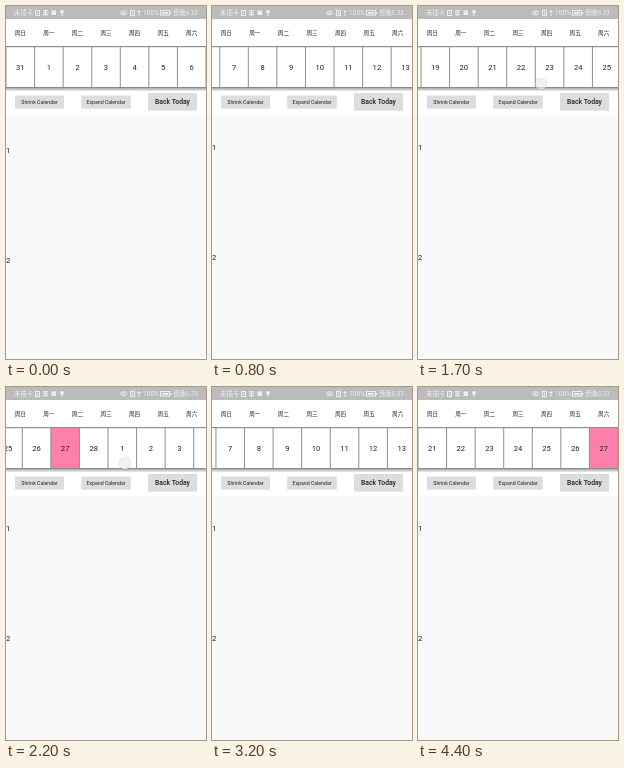
An HTML page with a canvas that plays this animation: 200x353 px, repeating every 4.5 s.

```html
<!DOCTYPE html>
<html lang="zh-CN">
<head>
<meta charset="utf-8">
<title>Week calendar</title>
<style>
  html, body { margin: 0; width: 100%; height: 100%; overflow: hidden; background: #f9f9f9; }
  canvas { display: block; width: 200px; height: 353px; }
</style>
</head>
<body>
<canvas id="stage"></canvas>
<script>
const W = 200, H = 353, LOOP = 4500, STEP = 100, CELL = W / 7;
const LATIN = 'Roboto, "Liberation Sans", sans-serif';
const CJK = '"Noto Sans CJK SC", "Noto Sans CJK", "Noto Sans CJK JP", sans-serif';
const canvas = document.getElementById('stage');
const ctx = canvas.getContext('2d');
const dpr = window.devicePixelRatio || 1;
canvas.width = W * dpr;
canvas.height = H * dpr;

// Each swipe moves one week; x, y is where the finger lifts.
const swipes = [
  { at: 403, dur: 600, dir: 1, x: 118, y: 77 },
  { at: 1020, dur: 500, dir: 1, x: 120, y: 77 },
  { at: 1535, dur: 500, dir: 1, x: 123, y: 78 },
  { at: 2060, dur: 493, dir: 1, x: 119, y: 76.5 },
  { at: 2553, dur: 887, dir: 1, x: 109.5, y: 80 },
  { at: 3440, dur: 380, dir: -1, x: 112, y: 77 },
  { at: 3820, dur: 375, dir: -1, x: 112, y: 77 }
];

const clamp = v => Math.max(0, Math.min(1, v));
const easeOut = u => 1 - Math.pow(1 - clamp(u), 3);

function rect(x, y, w, h, color) {
  ctx.fillStyle = color;
  ctx.fillRect(x, y, w, h);
}

function text(str, x, y, size, color = '#222', align = 'center', family = LATIN, weight = 400) {
  ctx.font = `${weight} ${size}px ${family}`;
  ctx.textAlign = align;
  ctx.fillStyle = color;
  ctx.fillText(str, x, y);
}

function frame(x, y, w, h, color) {
  ctx.strokeStyle = color;
  ctx.lineWidth = 1;
  ctx.strokeRect(x, y, w, h);
}

function disc(x, y, r, color) {
  ctx.fillStyle = color;
  ctx.beginPath();
  ctx.arc(x, y, r, 0, Math.PI * 2);
  ctx.fill();
}

function statusBar() {
  const ink = '#eeeeee';
  rect(0, 0, W, 13, '#bbbbbb');
  text('未插卡', 8, 9.3, 6.4, ink, 'left', CJK);
  frame(29.5, 4.5, 4, 5, ink);
  rect(31, 6, 1, 2, ink);
  for (let i = 0; i < 3; i++) rect(37, 4.2 + i * 2, 5, 1, ink);
  rect(39, 4.2, 1, 5.5, ink);
  rect(45.5, 4.5, 4.5, 4.5, ink);
  disc(56, 5.8, 1.9, ink);
  rect(55.5, 7, 1, 3, ink);
  ctx.strokeStyle = ink;
  ctx.lineWidth = 1;
  ctx.beginPath();
  ctx.ellipse(117.5, 6.8, 3, 2, 0, 0, Math.PI * 2);
  ctx.stroke();
  disc(117.5, 6.8, 1, ink);
  frame(124.5, 4.3, 4, 5.4, ink);
  rect(126, 5.5, 1, 3, ink);
  rect(132.5, 4, 1, 6, ink);
  rect(131.5, 5, 3, 1, ink);
  text('100%', 137, 9.2, 6.6, ink, 'left');
  frame(154.5, 4.5, 9, 4.6, ink);
  rect(156, 6, 6, 1.8, ink);
  rect(164, 6, 1.2, 2, ink);
  text('傍晚6:33', 167, 9.3, 6.3, ink, 'left', CJK);
}

function weekdays() {
  [...'日一二三四五六'].forEach((d, i) =>
    text('周' + d, (i + 0.5) * CELL, 28.6, 5.6, '#222', 'center', CJK));
}

// Day 0 is 31 January, followed by a 28-day February.
function dayNumber(i) {
  if (i < 1) return 31 + i;
  return i <= 28 ? i : i - 28;
}

function strip(scroll) {
  const first = Math.floor(scroll);
  rect(0, 40, W, 42, '#ffffff');
  for (let i = first; i < first + 9; i++) {
    const x = (i - scroll) * CELL;
    if (i === 27) rect(x, 41, CELL, 40, '#ff7fac');
    rect(x - 0.5, 41, 1, 40.5, '#8f8f8f');
    text(dayNumber(i), x + CELL / 2, 64.2, 7.6);
  }
  rect(0, 40, W, 1.2, '#8f8f8f');
  rect(0, 81, W, 1.4, '#8a8a8a');
  const shade = ctx.createLinearGradient(0, 82, 0, 85.5);
  shade.addColorStop(0, '#a0a0a0');
  shade.addColorStop(1, '#ffffff');
  rect(0, 82.2, W, 3.3, shade);
}

function button(label, x, y, h, size, weight) {
  rect(x, y + 0.5, 49, h, '#d2d2d2');
  rect(x, y, 49, h, '#dddddd');
  text(label, x + 24.5, y + h / 2 + size * 0.36, size, '#222', 'center', LATIN, weight);
}

function touch(s, t) {
  const age = t - s.at;
  if (age < 0 || age > 240) return;
  const lead = 50 * s.dir * (1 - clamp(age / 110));
  ctx.globalAlpha = 1 - clamp((age - 110) / 150);
  disc(s.x + lead, s.y, 6.3, 'rgba(150,150,150,0.4)');
  disc(s.x + lead, s.y, 5.6, 'rgba(250,250,250,0.9)');
  ctx.globalAlpha = 1;
}

function draw(t) {
  const scroll = swipes.reduce((sum, s) => sum + 7 * s.dir * easeOut((t - s.at) / s.dur), 0);
  const drop = 3 * (1 - easeOut(t / 300));
  ctx.setTransform(dpr, 0, 0, dpr, 0, 0);
  rect(0, 0, W, H, '#f9f9f9');
  rect(0, 13, W, 96, '#ffffff');
  statusBar();
  weekdays();
  strip(scroll);
  button('Shrink Calendar', 9, 89.5, 12.5, 5.2, 400);
  button('Expand Calendar', 75.5, 89.5, 12.5, 5.2, 400);
  button('Back Today', 142, 87, 17, 6.8, 500);
  text('1', 0, 143.7 + drop, 7.6, '#222', 'left');
  text('2', 0, 253.7 + drop, 7.6, '#222', 'left');
  swipes.forEach(s => touch(s, t));
}

const start = performance.now();
function tick() {
  const t = (performance.now() - start) % LOOP;
  draw(Math.floor(t / STEP) * STEP);
  requestAnimationFrame(tick);
}
tick();
</script>
</body>
</html>
```
